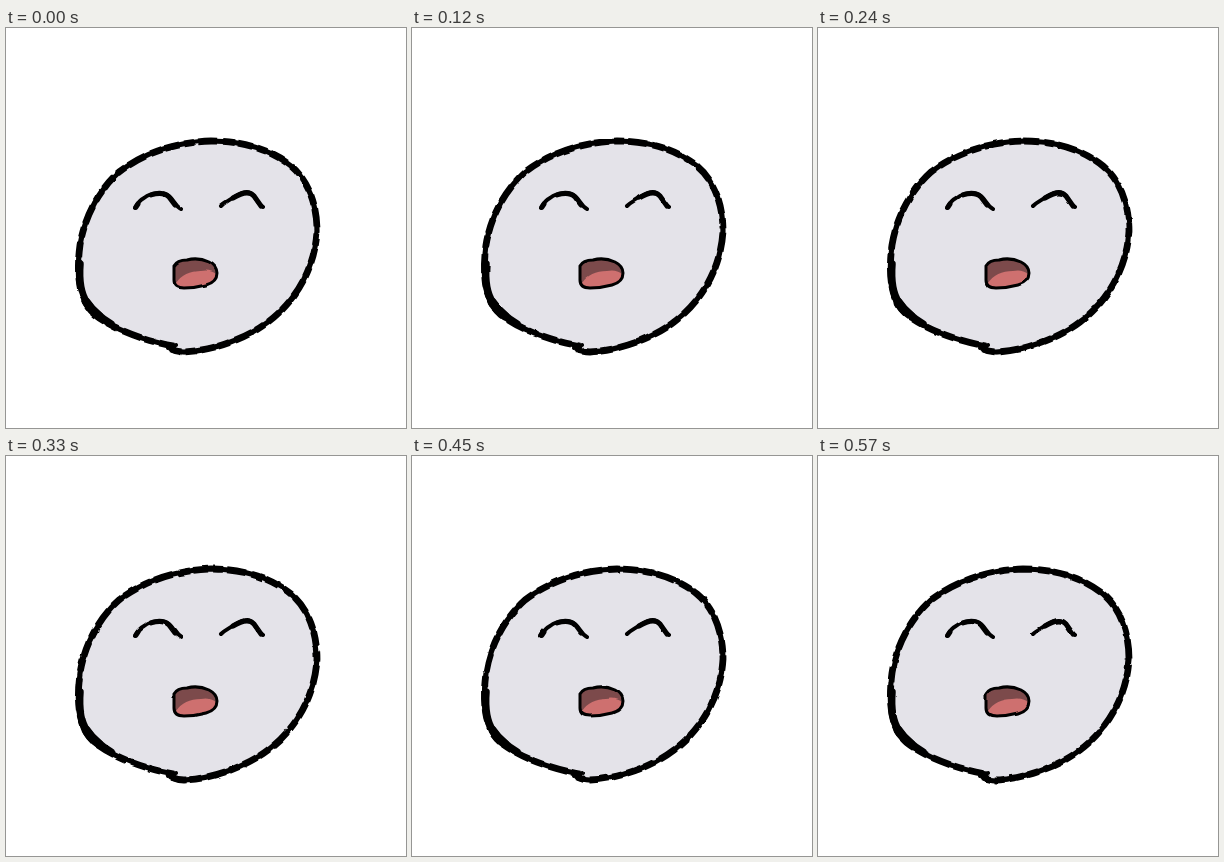
Recreate the animation shown at these times as an HTML page without scripts. Size 400 by 400 pixels, loop 0.6 s.

```html
<!DOCTYPE html>
<html lang="en">
<head>
<meta charset="utf-8">
<title>Wobbly face</title>
<style>
  html, body { margin: 0; width: 100%; height: 100%; overflow: hidden; background: #fff; }
  svg { display: block; width: 100vw; height: 100vh; }
  .ink { fill: none; stroke: #000; stroke-linecap: round; stroke-linejoin: round; }
  .dabs {
    stroke-width: 6.8;
    stroke-linecap: butt;
    stroke-dasharray: 15 5 10 4 19 6 12 3;
    animation: redraw .6s steps(20) infinite;
  }
  @keyframes redraw { to { stroke-dashoffset: 620; } }
</style>
</head>
<body>
<svg viewBox="0 0 400 400">
  <defs>
    <!-- Hand-drawn wobble: a fresh noise field every 30 ms -->
    <filter id="rough" filterUnits="userSpaceOnUse" x="50" y="90" width="290" height="260" color-interpolation-filters="sRGB">
      <feTurbulence type="fractalNoise" baseFrequency=".06" numOctaves="1" result="noise">
        <animate attributeName="seed" calcMode="discrete" dur=".6s" repeatCount="indefinite"
          values="1;2;3;4;5;6;7;8;9;10;11;12;13;14;15;16;17;18;19;20"/>
      </feTurbulence>
      <feDisplacementMap in="SourceGraphic" in2="noise" scale="2.5" xChannelSelector="R" yChannelSelector="G"/>
    </filter>
    <path id="head" d="M168 318 C140 313 108 302 88 286 C73 273 70 247 74 217
      C79 186 95 160 113 144 C139 124 172 114 205 113 C236 113 264 121 285 138
      C303 153 311 178 311 203 C309 240 290 273 262 294 C240 311 205 323 178 324 Q171 324 165 321"/>
    <path id="lips" d="M168 238 Q171 232 181 232 Q192 229 203 234 Q211 238 211 245
      Q211 254 200 257 Q189 260 178 260 Q168 260 168 252 Z"/>
    <clipPath id="inside"><use href="#lips"/></clipPath>
  </defs>

  <use href="#head" fill="#e4e3e9"/>
  <g class="ink" filter="url(#rough)">
    <use href="#head" stroke-width="5.2"/>
    <use href="#head" class="dabs"/>
    <path d="M74 236 Q72 262 81 275 Q90 287 105 296" stroke-width="7.5"/>
    <path d="M80 274 Q85 282 93 288" stroke-width="9"/>
    <path d="M162 320 L170 317 M167 323 Q181 326 196 322" stroke-width="4"/>
  </g>

  <g filter="url(#rough)">
    <g class="ink" stroke-width="4">
      <path d="M129 180 C132 174 134 172 138 170 C146 164 157 163 163 168 C168 172 169 178 175 181"/>
      <path d="M215 178 C219 174 224 172 228 169 C236 164 243 162 247 167 C251 172 252 176 257 179"/>
    </g>
    <g class="ink" stroke-width="5">
      <path d="M130 179 L132 176 M145 167 Q157 163 163 169 L169 177"/>
      <path d="M227 170 Q242 161 248 168 L255 178"/>
    </g>
    <use href="#lips" fill="#7c4a4b"/>
    <path clip-path="url(#inside)" fill="#ce706f" d="M168 264 L170 255 Q178 243 195 243 Q204 241 210 246 L212 264 Z"/>
    <use href="#lips" class="ink" stroke-width="3"/>
  </g>
</svg>
</body>
</html>
```
